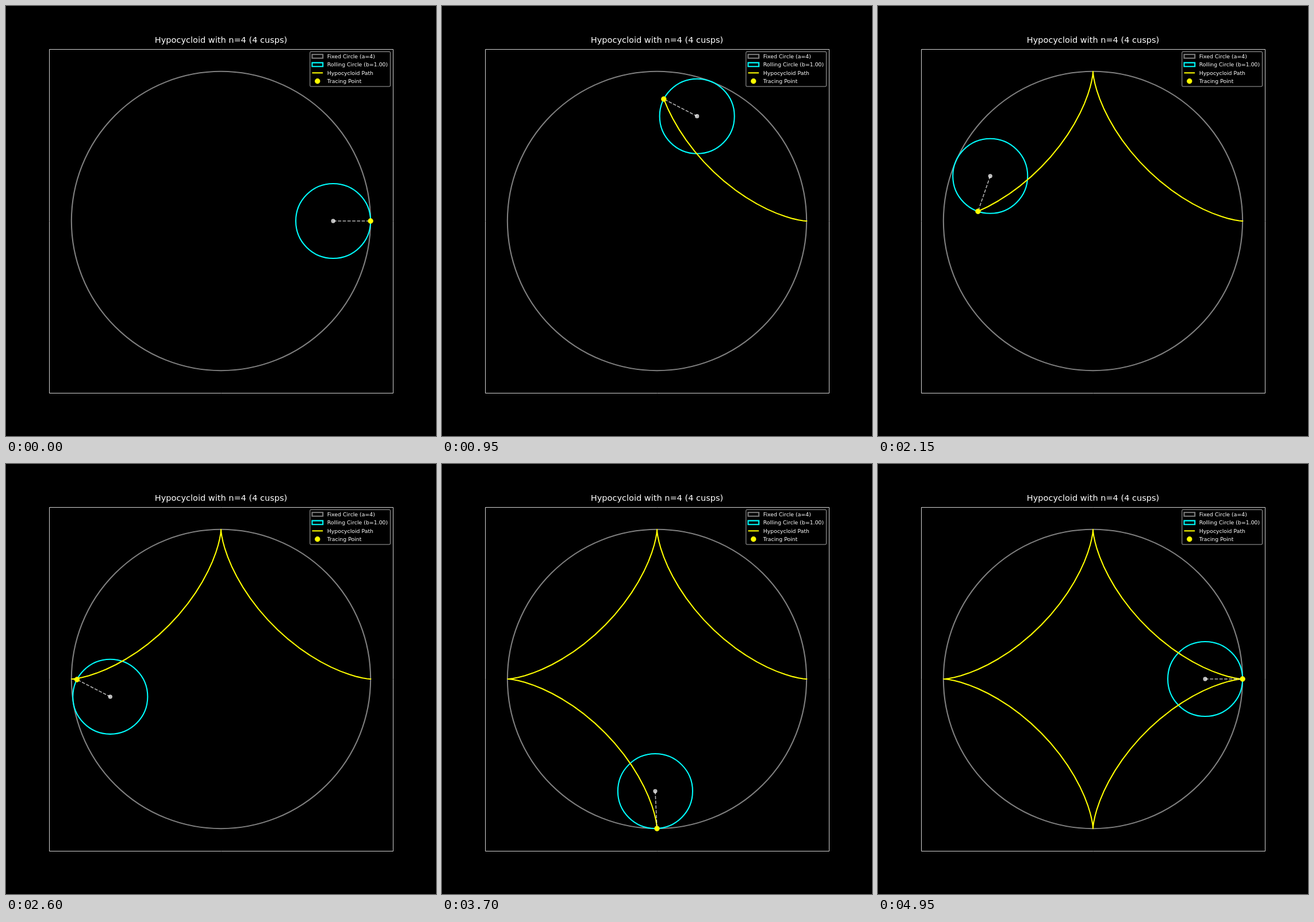
These frames come from a looping animation (748x748 px, 5 s). An HTML page with a canvas:

```html
<!DOCTYPE html>
<html>
<head>
<meta charset="utf-8">
<style>
  html, body { margin: 0; height: 100%; overflow: hidden; background: #000; }
  canvas { display: block; }
</style>
</head>
<body>
<canvas id="stage" width="748" height="748"></canvas>
<script>
const ctx = document.getElementById('stage').getContext('2d');
const TAU = 2 * Math.PI;
const STEPS = 100, STEP_MS = 50;
const PT = 748 / 720;            // pixels per point
const UNIT = 598.4 / 9.2;        // pixels per axis unit
const MID = 374;
const A = 4, B = 1;

const toX = x => MID + x * UNIT;
const toY = y => MID - y * UNIT;
const angle = i => i * TAU / (STEPS - 1);
const center = t => [toX((A - B) * Math.cos(t)), toY((A - B) * Math.sin(t))];

function tracer(t) {
  const [x, y] = center(t), spin = (A - B) / B * t;
  return [x + B * UNIT * Math.cos(spin), y + B * UNIT * Math.sin(spin)];
}

function stroke(color, points) {
  ctx.strokeStyle = color;
  ctx.lineWidth = points * PT;
  ctx.stroke();
}

function circle(x, y, r, color) {
  ctx.beginPath();
  ctx.arc(x, y, r, 0, TAU);
  stroke(color, 2);
}

function dot(x, y, size, color) {
  ctx.beginPath();
  ctx.arc(x, y, size / 2 * PT, 0, TAU);
  ctx.fillStyle = color;
  ctx.fill();
  stroke(color, 1);
}

function polyline(points, color, width) {
  ctx.beginPath();
  points.forEach(p => ctx.lineTo(...p));
  stroke(color, width);
}

function text(str, x, y, size, align) {
  ctx.font = `${size * PT}px "DejaVu Sans", sans-serif`;
  ctx.textAlign = align;
  ctx.fillStyle = '#fff';
  ctx.fillText(str, x, y);
}

function drawLegend() {
  ctx.globalAlpha = 0.8;
  ctx.beginPath();
  ctx.roundRect(528.8, 79.5, 139.7, 60.5, 1.87);
  ctx.fillStyle = '#000';
  ctx.fill();
  stroke('#ccc', 1);
  ctx.globalAlpha = 1;

  const left = 532.5, width = 18.7, height = 6.55;
  const box = color => y => {
    ctx.beginPath();
    ctx.rect(left, y - height / 2, width, height);
    stroke(color, 2);
  };
  const rows = [
    ['Fixed Circle (a=4)', box('#808080')],
    ['Rolling Circle (b=1.00)', box('#0ff')],
    ['Hypocycloid Path', y => polyline([[left, y], [left + width, y]], '#ff0', 2)],
    ['Tracing Point', y => dot(left + width / 2, y, 8, '#ff0')]
  ];
  rows.forEach(([label, drawHandle], i) => {
    const base = 90.75 + 14.43 * i;
    drawHandle(base - height / 2);
    text(label, 558.7, Math.round(base), 9, 'left');
  });
}

function draw(step) {
  const t = angle(step), hub = center(t), tip = tracer(t);
  ctx.fillStyle = '#000';
  ctx.fillRect(0, 0, 748, 748);

  circle(MID, MID, A * UNIT, '#808080');
  circle(...hub, B * UNIT, '#0ff');

  ctx.lineJoin = 'round';
  ctx.lineCap = 'square';
  polyline(Array.from({ length: step + 1 }, (_, i) => tracer(angle(i))), '#ff0', 2);
  ctx.lineCap = 'butt';
  ctx.lineJoin = 'miter';

  ctx.globalAlpha = 0.7;
  ctx.setLineDash([3.7, 1.6].map(d => d * 1.5 * PT));
  polyline([hub, tip], '#fff', 1.5);
  ctx.setLineDash([]);
  dot(...hub, 6, '#fff');
  ctx.globalAlpha = 1;
  dot(...tip, 8, '#ff0');

  ctx.beginPath();
  ctx.rect(75.5, 75.5, 598, 598);
  stroke('#fff', 0.8);
  text('Hypocycloid with n=4 (4 cusps)', MID, 64, 14, 'center');
  drawLegend();
}

function tick() {
  draw(Math.floor(performance.now() / STEP_MS) % STEPS);
  requestAnimationFrame(tick);
}
tick();
</script>
</body>
</html>
```
